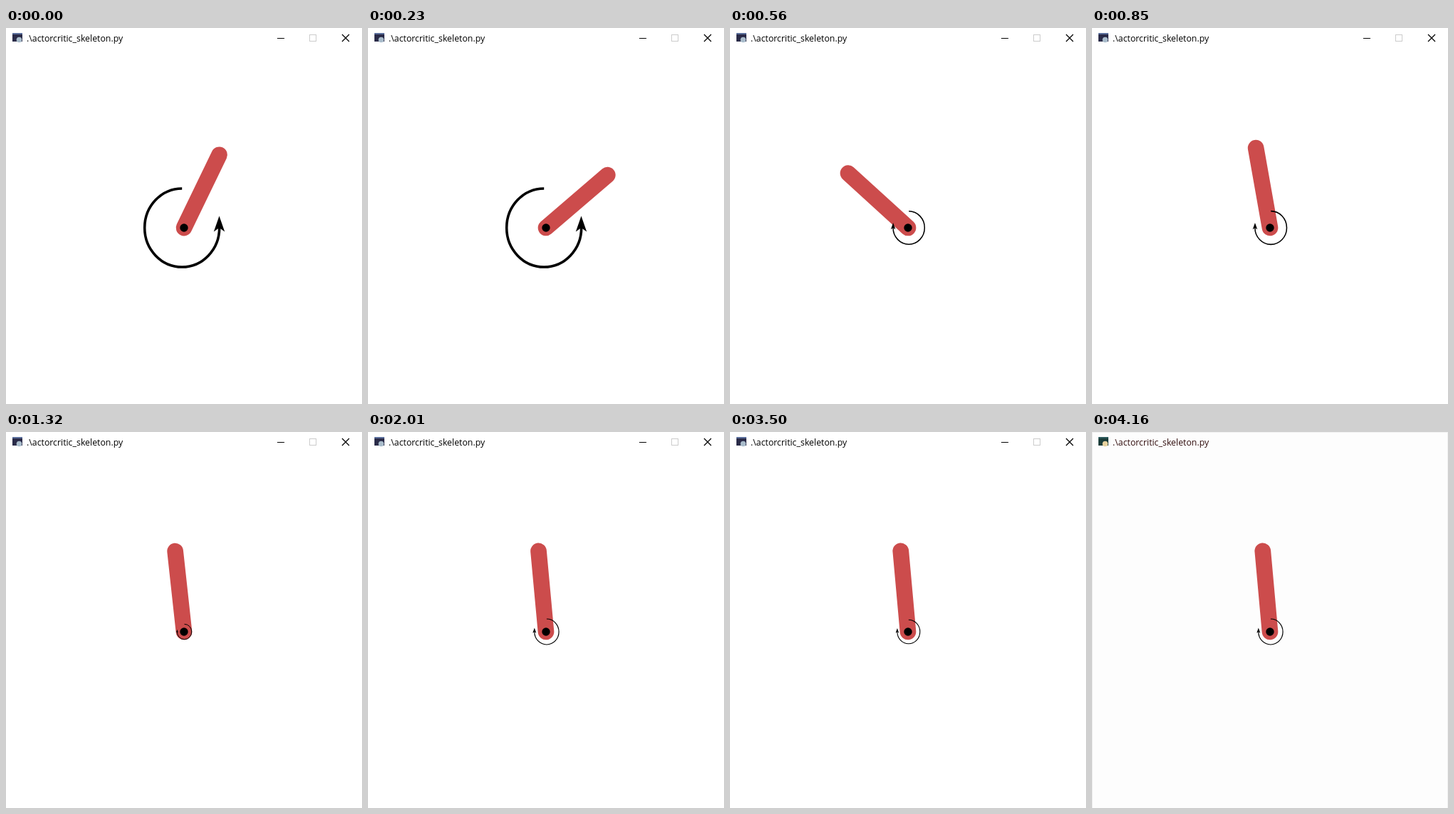
An HTML page with a canvas for the animation above (4.21 s loop, 500x527 px).

```html
<!DOCTYPE html>
<html lang="en">
<head>
<meta charset="utf-8">
<title>Pendulum</title>
<style>
html, body { margin: 0; width: 100%; height: 100%; overflow: hidden; background: #fff; }
canvas { position: absolute; left: 0; top: 0; display: block; }
#title {
  position: absolute; left: 29px; top: 5px; white-space: pre;
  font: 12.33px/19px "Open Sans", "Noto Sans", sans-serif; color: #000;
}
</style>
</head>
<body>
<canvas id="stage" width="500" height="527"></canvas>
<div id="title">.\actorcritic_skeleton.py</div>
<script>
const W = 500, H = 527, LOOP = 4210, FADE = 4160;
const PIVOT = { x: 250, y: 280 }, ROD = 113.6, ROD_WIDTH = 22.7;
const START = .434, REST = 2 * Math.PI - .09;
const ctx = document.getElementById('stage').getContext('2d');
const title = document.getElementById('title');

// The picture advances every 50 ms, every sixth step is short, and one step lingers.
const steps = [];
for (let i = 0, t = 0; t < FADE - 10; i++) {
  steps.push(t);
  t += i === 43 ? 100 : i % 6 === 2 ? 30 : 50;
}
steps.push(FADE);

const sigmoid = x => 1 / (1 + Math.exp(-x));
const bell = x => Math.exp(-x * x);

// Rod angle, clockwise from upright: one swing through the bottom, then a slow settle.
function angleAt(t) {
  const lag = .163 * Math.exp((560 - t) / 345);
  return START + (REST - START - lag) * sigmoid((t - 405) / 71.8);
}

// Signed torque, at most 1; positive turns counter-clockwise.
function torqueAt(t) {
  const brake = 1.327 * sigmoid((443 - t) / 39.5);
  const push = .26 * bell((t - 680) / 150);
  const ease = .112 * bell((t - 1320) / 120);
  const ripple = .028 * Math.sin(2 * Math.PI * (t - 2010) / 1075);
  return Math.min(1, -.327 + brake - push + ease + ripple);
}

function disc(x, y, r, color) {
  ctx.fillStyle = color;
  ctx.beginPath();
  ctx.arc(x, y, r, 0, 2 * Math.PI);
  ctx.fill();
}

function line(x0, y0, x1, y1, color, width) {
  ctx.strokeStyle = color;
  ctx.lineWidth = width;
  ctx.beginPath();
  ctx.moveTo(x0, y0);
  ctx.lineTo(x1, y1);
  ctx.stroke();
}

function drawBar(fading) {
  ctx.lineCap = 'butt';
  ctx.fillStyle = fading ? '#1b3d3a' : '#2a2b48';
  ctx.fillRect(9, 7, 14, 12);
  ctx.fillStyle = fading ? '#2c5a5c' : '#5b6f9c';
  ctx.fillRect(9, 7, 14, 2);
  disc(18.5, 16.5, 3.8, fading ? '#e8d3a0' : '#a9bccb');
  title.style.color = fading ? '#300c0c' : '#000';
  if (fading) return;
  line(381, 14.5, 391, 14.5, '#000', 1);
  ctx.strokeStyle = '#ccc';
  ctx.strokeRect(426.5, 9.5, 9, 9);
  line(472, 9, 482, 19, '#000', 1.2);
  line(482, 9, 472, 19, '#000', 1.2);
}

function drawRod(angle) {
  const { x, y } = PIVOT;
  ctx.lineCap = 'round';
  line(x, y, x + ROD * Math.sin(angle), y - ROD * Math.cos(angle), '#cc4c4c', ROD_WIDTH);
  disc(x, y, 5.7, '#000');
}

function drawTorque(u) {
  const size = Math.abs(u);
  if (size < .01) return;
  ctx.save();
  ctx.translate(PIVOT.x, PIVOT.y);
  ctx.scale(u, size);
  ctx.translate(-2.8, 0);
  ctx.lineCap = 'butt';
  ctx.strokeStyle = ctx.fillStyle = '#000';
  ctx.lineWidth = Math.max(3.6, 1 / size);
  ctx.beginPath();
  ctx.ellipse(0, 0, 52.5, 55, 0, -Math.PI / 2, 0, true);
  ctx.stroke();
  ctx.translate(52.3, 0);
  ctx.beginPath();
  ctx.moveTo(0, -16.5);
  ctx.lineTo(7.7, 5.5);
  ctx.lineTo(0, 0);
  ctx.lineTo(-7.7, 5.5);
  ctx.fill();
  ctx.restore();
}

function draw(t) {
  const fading = t >= FADE;
  ctx.fillStyle = fading ? '#fdfdfd' : '#fff';
  ctx.fillRect(0, 0, W, H);
  if (fading) {
    ctx.strokeStyle = '#f0f0f0';
    ctx.lineWidth = 1;
    ctx.strokeRect(.5, .5, W - 1, H);
  }
  drawBar(fading);
  drawRod(angleAt(t));
  drawTorque(torqueAt(t));
}

let start = null, shown = 0;
function tick(now) {
  if (start === null) start = now;
  const t = (now - start) % LOOP;
  const step = steps.findLastIndex(s => s <= t);
  if (step !== shown) draw(steps[shown = step]);
  requestAnimationFrame(tick);
}
draw(0);
requestAnimationFrame(tick);
</script>
</body>
</html>
```
